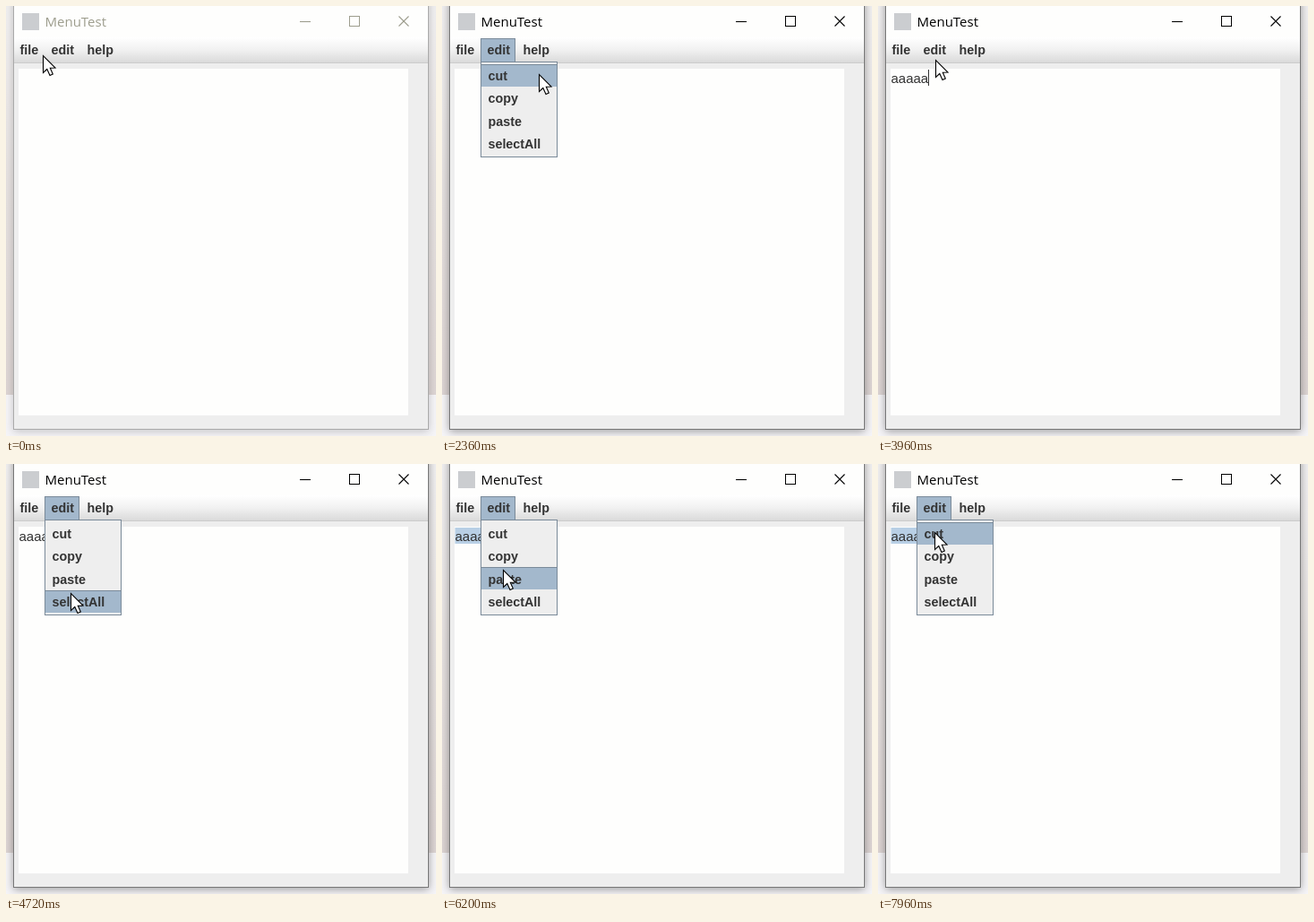
An HTML page with a canvas that plays this animation: 480x480 px, repeating every 8 s.

```html
<!DOCTYPE html>
<html lang="en">
<head>
<meta charset="utf-8">
<title>MenuTest</title>
<style>
html, body { margin: 0; width: 100%; height: 100%; overflow: hidden; background: #e4e0e0; }
canvas { display: block; width: 480px; height: 480px; }
</style>
</head>
<body>
<canvas id="stage" width="480" height="480"></canvas>
<script>
const ctx = document.getElementById('stage').getContext('2d');
const LOOP = 8000;
const BOLD = 'bold 14.3px "Liberation Sans", Arial, sans-serif';
const PLAIN = '15px "Liberation Sans", Arial, sans-serif';
const TITLE = '15px "Open Sans", "Noto Sans", sans-serif';
const PANEL = '#eeeeee', HOVER = '#a3b8cc', EDGE = '#7a8a99', INK = '#333333';
const ITEMS = ['cut', 'copy', 'paste', 'selectAll'];
const ROW_TOP = 64.5, ROW = 25.4;
const START = { x: 41, y: 55 }, EDIT = { x: 64, y: 60 };

// Each pointer move starts at `at`, lasts `span` and may end in a click that toggles the menu.
const CLICK_DELAY = 100;
const MOVES = [
  { at: 100, span: 660, to: EDIT, click: true },
  { at: 860, span: 290, to: { x: 78, y: 53 } },
  { at: 1700, span: 620, to: { x: 108, y: 76 }, click: true },
  { at: 2540, span: 220, to: { x: 104, y: 99 } },
  { at: 3400, span: 560, to: EDIT, click: true },
  { at: 4200, span: 500, to: { x: 72, y: 144 }, click: true },
  { at: 5080, span: 360, to: EDIT, click: true },
  { at: 5600, span: 580, to: { x: 68, y: 118 } },
  { at: 6220, span: 240, to: { x: 68, y: 104 }, click: true },
  { at: 6800, span: 780, to: EDIT, click: true },
  { at: 7680, span: 260, to: { x: 63, y: 76 } }
];
const CLICKS = MOVES.filter(m => m.click).map(m => m.at + m.span + CLICK_DELAY);
const ACTIVE_AT = CLICKS[0], SELECT_AT = CLICKS[3];
const TYPE_AT = 2860, TYPE_STEP = 120;

function pointerAt(t) {
  let { x, y } = START;
  for (const { at, span, to } of MOVES) {
    const u = Math.min(1, Math.max(0, (t - at) / span));
    const e = u * u * (3 - 2 * u);
    x += (to.x - x) * e;
    y += (to.y - y) * e;
  }
  return { x, y };
}

const menuOpenAt = t => CLICKS.filter(c => c <= t).length % 2 === 1;

function rect(x, y, w, h, fill) {
  ctx.fillStyle = fill;
  ctx.fillRect(x, y, w, h);
}

function frame(x, y, w, h, color) {
  ctx.strokeStyle = color;
  ctx.lineWidth = 1;
  ctx.strokeRect(x + 0.5, y + 0.5, w - 1, h - 1);
}

function gradient(y0, y1, ...colors) {
  const g = ctx.createLinearGradient(0, y0, 0, y1);
  colors.forEach((c, i) => g.addColorStop(i / (colors.length - 1), c));
  return g;
}

function label(text, x, y, font, fill) {
  ctx.font = font;
  ctx.fillStyle = fill;
  ctx.fillText(text, x, y);
}

function line(color, x0, y0, x1, y1) {
  ctx.strokeStyle = color;
  ctx.lineWidth = 1.1;
  ctx.beginPath();
  ctx.moveTo(x0, y0);
  ctx.lineTo(x1, y1);
  ctx.stroke();
}

function drawDesktop(active) {
  rect(0, 0, 480, 434, gradient(0, 434, '#f0eff0', '#e4dfde', '#dcd4d3'));
  rect(0, 434, 480, 46, '#f5f4f7');
  ctx.save();
  ctx.shadowColor = active ? 'rgba(50,50,50,.45)' : 'rgba(50,50,50,.25)';
  ctx.shadowBlur = 9;
  ctx.shadowOffsetY = 2;
  rect(8, -10, 464, 483, PANEL);
  ctx.restore();
}

function drawWindow(active) {
  const ink = active ? '#000000' : '#9d9d8d';
  rect(8, 0, 464, 35, '#fefefd');
  rect(18, 8, 19, 19, '#cbcdd0');
  label('MenuTest', 43.5, 23, TITLE, ink);
  line(ink, 328, 17.5, 340, 17.5);
  frame(383, 11, 12, 12, ink);
  line(ink, 438.5, 11.5, 449.5, 22.5);
  line(ink, 449.5, 11.5, 438.5, 22.5);

  rect(8, 35, 464, 28, gradient(35, 63, '#ffffff', '#f1f1f1', '#dadada'));
  rect(8, 63, 464, 1, '#cccccc');
  rect(14, 70, 435, 387, '#fefefd');
  frame(8, -2, 464, 475, active ? '#777777' : '#aaaaaa');
}

function drawText(t, menuOpen) {
  const typed = Math.floor((t - TYPE_AT) / TYPE_STEP) + 1;
  const text = 'a'.repeat(Math.max(0, Math.min(5, typed)));
  ctx.font = PLAIN;
  const width = ctx.measureText(text).width;
  if (t >= SELECT_AT) rect(14.5, 71, width, 18, '#b8cfe5');
  label(text, 14.5, 86, PLAIN, INK);
  const blinkOn = t < SELECT_AT || t % 1000 < 500;
  if (t >= TYPE_AT && !menuOpen && blinkOn) rect(Math.round(14.5 + width), 71, 1, 18, INK);
}

function drawMenu(open, pointer) {
  if (open) {
    rect(43, 36, 39, 27, HOVER);
    frame(43, 36, 39, 27, EDGE);
  }
  label('file', 15.5, 54, BOLD, INK);
  label('edit', 50.5, 54, BOLD, INK);
  label('help', 90.5, 54, BOLD, INK);
  if (!open) return;

  rect(43, 62, 86, 107, PANEL);
  frame(43, 62, 86, 107, EDGE);
  const hovered = Math.floor((pointer.y - ROW_TOP) / ROW);
  ITEMS.forEach((name, i) => {
    const top = Math.round(ROW_TOP + i * ROW);
    if (i === hovered) {
      rect(44, top, 84, 25, HOVER);
      rect(44, top, 84, 1, EDGE);
    }
    label(name, 51.5, 83 + i * ROW, BOLD, INK);
  });
}

function drawArrow() {
  ctx.translate(0.5, 0.5);
  ctx.fillStyle = '#ffffff';
  ctx.strokeStyle = '#000000';
  ctx.lineWidth = 1.1;
  const shape = new Path2D('M0 0V19L4.3 15L7.5 22L10.8 20.5L7.8 13.8L13.5 13.5Z');
  ctx.fill(shape);
  ctx.stroke(shape);
}

function drawBeam() {
  line('#000000', 0.5, -8, 0.5, 9);
  line('#000000', -3, -8.5, 4, -8.5);
  line('#000000', -3, 9.5, 4, 9.5);
}

function drawPointer({ x, y }, overText) {
  ctx.save();
  ctx.translate(Math.round(x), Math.round(y));
  if (overText) drawBeam();
  else drawArrow();
  ctx.restore();
}

function draw(t) {
  const active = t >= ACTIVE_AT;
  const open = menuOpenAt(t);
  const pointer = pointerAt(t);
  drawDesktop(active);
  drawWindow(active);
  drawText(t, open);
  drawMenu(open, pointer);
  drawPointer(pointer, !open && pointer.y > 70);
}

const start = performance.now();
function tick() {
  draw((performance.now() - start) % LOOP);
  requestAnimationFrame(tick);
}
tick();
</script>
</body>
</html>
```
